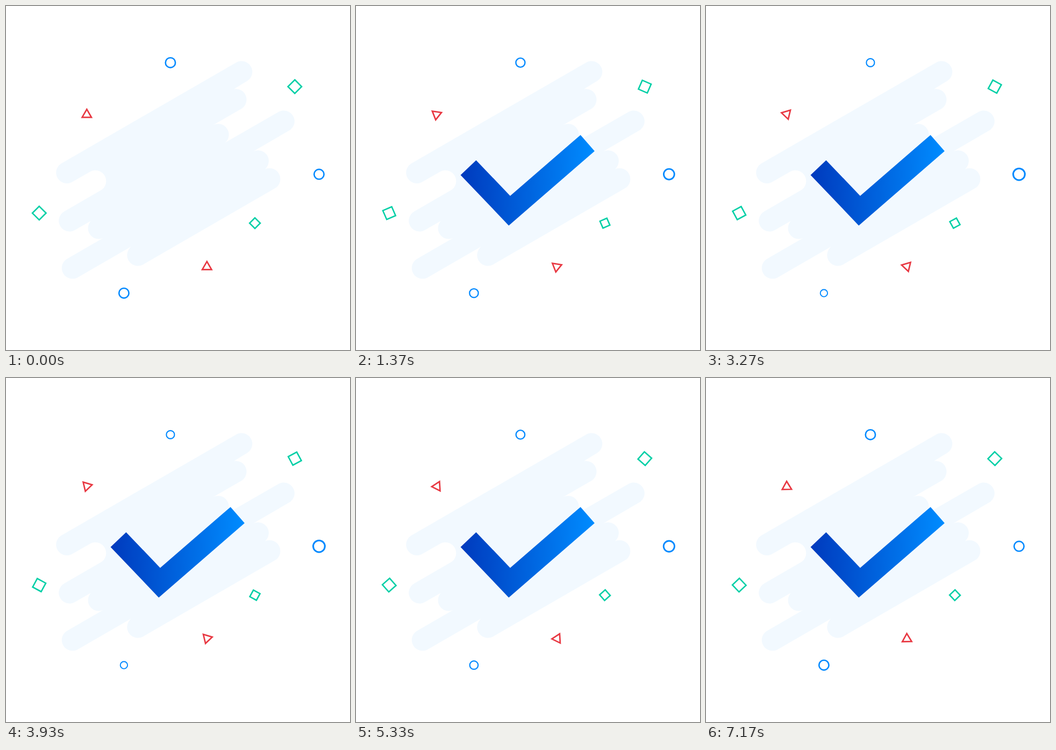
Write an HTML page that moves like this. It is 640 by 640 pixels and loops after 7.21 s.

```html
<!DOCTYPE html>
<html lang="en">
<head>
<meta charset="utf-8">
<title>Check mark</title>
<style>
  html, body { margin: 0; width: 100%; height: 100%; overflow: hidden; background: #fff; }
  svg { display: block; width: 100vw; height: 100vh; }
  .blue { stroke: #0089ff; }
  .green { stroke: #00cfa6; }
  .red { stroke: #e83842; }
</style>
</head>
<body>
<svg viewBox="0 0 640 640" fill="none">
  <defs>
    <linearGradient id="shade" gradientUnits="userSpaceOnUse" x1="195" y1="0" x2="444" y2="0">
      <stop offset="0" stop-color="#003abd"/>
      <stop offset="1" stop-color="#008cff"/>
    </linearGradient>
  </defs>
  <path fill="#f2f9ff" d="M102.5 293.2L429 104.7A20 20 0 0 1 449 139.3L424 154.5
    A20 20 0 0 1 436 192.3L384 222.3A20 20 0 0 1 408 254.1L507.5 196.7
    A20 20 0 0 1 527.5 231.3L460 270.5A20 20 0 0 1 482 303.5A20 20 0 0 1 498.5 340.3
    L258 479.2A20 20 0 0 1 233 447.6L133 505.3A20 20 0 0 1 113 470.7L181 431.6
    A20 20 0 0 1 158 399.8L127.5 417.3A20 20 0 0 1 107.5 382.7L177 342.6
    A20 20 0 0 0 157 308L122.5 327.8A20 20 0 0 1 102.5 293.2Z"/>
  <path id="check" d="M209 300.7L285.5 380.8L430.8 255" stroke="url(#shade)" stroke-width="40"/>
  <g id="bits"></g>
</svg>
<script>
  const LOOP = 7210, TURN = 7200, DRAW = 1000;
  const bits = document.getElementById('bits');
  const check = document.getElementById('check');
  const length = check.getTotalLength();
  const movers = [];

  function add(tag, attrs, x, y, motion) {
    const el = document.createElementNS('http://www.w3.org/2000/svg', tag);
    for (const key in attrs) el.setAttribute(key, attrs[key]);
    bits.append(el);
    movers.push(p => el.setAttribute('transform', `translate(${x} ${y}) ${motion(p)}`));
  }

  const spin = dir => p => `rotate(${dir * 360 * p})`;
  const pulse = peak => p => `scale(${1 + (peak - 1) * (1 - Math.abs(1 - 2 * p))})`;

  function circle(x, y, peak) {
    add('circle', { class: 'blue', r: 9.2, 'stroke-width': 2.6 }, x, y, pulse(peak));
  }
  function square(x, y, half, dir) {
    const d = half * Math.SQRT2;
    add('path', { class: 'green', d: `M0 ${-d}L${d} 0L0 ${d}L${-d} 0Z`, 'stroke-width': 2.6 }, x, y, spin(dir));
  }
  function triangle(x, y) {
    add('path', { class: 'red', d: 'M0 -9.4L8.66 5.6H-8.66Z', 'stroke-width': 2.7 }, x, y, spin(1));
  }

  circle(305.9, 105.4, 0.8);
  circle(582.4, 313.1, 1.2);
  circle(219.4, 534.2, 0.7);
  square(537.3, 150, 9, 1);
  square(61.8, 385.3, 9, -1);
  square(463.1, 404, 7, -1);
  triangle(150.3, 201.6);
  triangle(373.8, 484.8);

  const ease = k => k < 0.5 ? 2 * k * k : 1 - 2 * (1 - k) * (1 - k);

  function render(t) {
    const p = Math.min(t / TURN, 1);
    movers.forEach(move => move(p));
    const drawn = ease(Math.min(t / DRAW, 1));
    check.style.visibility = drawn > 0.001 ? 'visible' : 'hidden';
    check.setAttribute('stroke-dasharray', drawn < 1 ? `${length * drawn} ${length * 2}` : 'none');
  }

  const start = performance.now();
  function tick() {
    render((performance.now() - start) % LOOP);
    requestAnimationFrame(tick);
  }
  render(0);
  requestAnimationFrame(tick);
</script>
</body>
</html>
```
